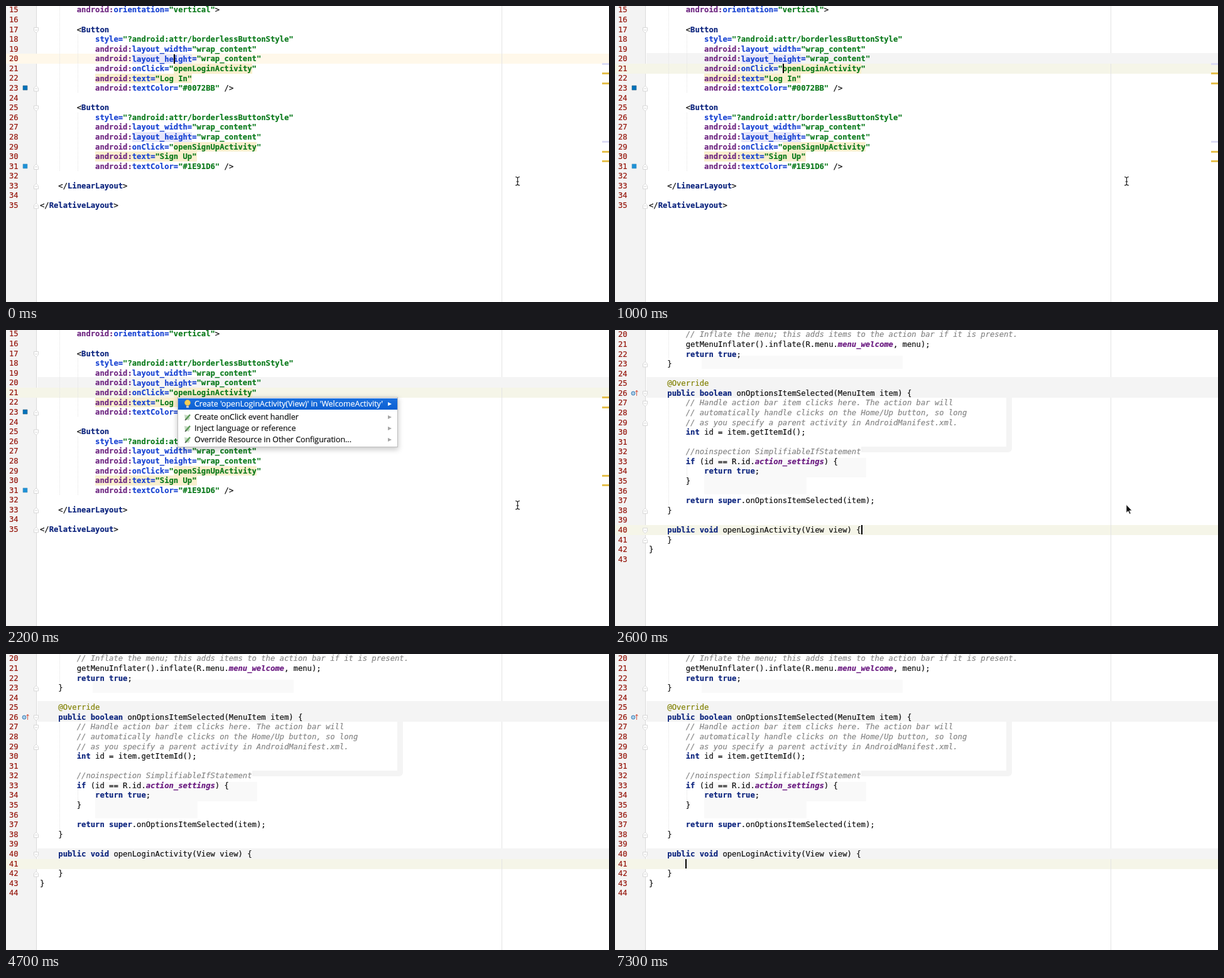
Write an HTML page that moves like this. It is 960 px wide and 472 px high and loops after 7.4 s.

```html
<!DOCTYPE html>
<html lang="en">
<head>
<meta charset="utf-8">
<title>Create an onClick handler</title>
<style>
  html, body { margin: 0; width: 100%; height: 100%; overflow: hidden; background: #fff; }
  #stage { position: absolute; left: 0; top: 0; width: 960px; height: 472px; overflow: hidden; }
  #stage svg, .view { position: absolute; left: 0; top: 0; width: 960px; height: 472px; }
  pre {
    position: absolute; left: 54px; margin: 0; color: #111;
    font: 12.2px/15.585px "DejaVu Sans Mono", monospace;
    -webkit-text-stroke: .2px;
  }
  pre.numbers { left: 5px; color: #96180e; }

  .tag, .key { color: #0b237d; font-weight: bold; }
  .ns { color: #6d2580; font-weight: bold; }
  .attr { color: #1742d2; font-weight: bold; }
  .str { color: #0b7a1c; font-weight: bold; }
  .note { color: #868686; font-style: italic; }
  .anno { color: #808000; }
  .field { color: #6a1a80; font-weight: bold; font-style: italic; }
  mark { color: inherit; padding: .7px 0; background: #f9efcd; }

  /* One shared clock: every change is a hard step */
  .timed, .usage, #row, #caret {
    animation-duration: 7.4s; animation-timing-function: step-end; animation-iteration-count: infinite;
  }
  #row { position: absolute; left: 0; top: 0; width: 960px; height: 16px; animation-name: row; }
  #caret { position: absolute; left: 0; top: 0; width: 2px; height: 15px; background: #000; animation-name: caret, blink; }
  .usage { animation-name: forget; }
  #layout { animation-name: untilOpen; }
  #moved { animation-name: afterMove; }
  #popup { animation-name: menu; }
  #activity { animation-name: fromOpen; }
  #before { animation-name: untilEnter; }
  #entered, #after { animation-name: fromEnter; }
  #braces { animation-name: braces; }

  @keyframes row {
    0% { transform: translateY(76px); background: #fff8ea; }
    12.16% { transform: translateY(92px); background: #f5f5e8; }
    33.78% { transform: translateY(311px); background: #f5f5e8; }
    54.05%, 100% { transform: translateY(327px); background: #f5f5e8; }
  }
  @keyframes caret {
    0% { transform: translate(267px, 77px); }
    12.16% { transform: translate(267px, 92px); }
    33.78% { transform: translate(392px, 311px); }
    54.05%, 100% { transform: translate(112px, 327px); }
  }
  @keyframes blink {
    0%, 12.16%, 33.78%, 47.29%, 54.05%, 67.56%, 81.08%, 94.59% { opacity: 1; }
    6.75%, 18.91%, 40.54%, 60.81%, 74.32%, 87.83% { opacity: 0; }
    100% { opacity: 1; }
  }
  @keyframes forget {
    0% { background: #e6e6fa; fill: #dcdcf5; }
    16.21%, 100% { background: transparent; fill: transparent; }
  }
  @keyframes untilOpen { 0% { opacity: 1; } 33.78%, 100% { opacity: 0; } }
  @keyframes afterMove { 0% { opacity: 0; } 12.16%, 100% { opacity: 1; } }
  @keyframes menu { 0% { opacity: 0; } 24.32%, 100% { opacity: 1; } }
  @keyframes fromOpen { 0% { opacity: 0; } 33.78%, 100% { opacity: 1; } }
  @keyframes untilEnter { 0% { opacity: 1; } 54.05%, 100% { opacity: 0; } }
  @keyframes fromEnter { 0% { opacity: 0; } 54.05%, 100% { opacity: 1; } }
  @keyframes braces { 0% { opacity: 0; } 36.48%, 100% { opacity: 1; } }

  #popup {
    position: absolute; left: 274px; top: 108px; width: 349px; height: 78px; background: #fff;
    box-shadow: 0 0 0 1px #bdbdbd, 0 3px 8px 2px rgba(0, 0, 0, .2);
    font: 12.4px/18px "Open Sans", "Noto Sans", sans-serif; color: #111;
    -webkit-text-stroke: .2px;
  }
  #popup div { position: absolute; left: 0; width: 323px; height: 18px; padding-left: 26px; white-space: pre; }
  #popup div:first-child { background: linear-gradient(#1b70de, #0b5fd2); color: #fff; }
  #popup div::after {
    content: ""; position: absolute; left: 334px; top: 6px;
    border: solid transparent; border-width: 3.5px 0 3.5px 6px; border-left-color: #a5a5a5;
  }
  #popup div:first-child::after { border-left-color: #fff; }
  #popup div svg { left: 7px; top: 1px; width: 16px; height: 16px; }
</style>
</head>
<body>
<div id="stage">
  <svg>
    <path d="M0 0H48V472H0Z" fill="#f3f3f3"/>
    <path d="M48.5 0V472" stroke="#dadada"/>
  </svg>
  <div id="row"></div>
  <svg><path d="M789.5 0V472" stroke="#e3e3e3"/></svg>

  <div id="layout" class="view timed">
    <svg>
      <path id="moved" class="timed" d="M50 75H960V92H50Z" fill="#f4f4f4"/>
      <path d="M85.5 0V263M114.5 45V139M114.5 170V263" stroke="#e2e2e2" stroke-dasharray="1 1"/>
      <path d="M27 127h7v7h-7z" fill="#0072bb" stroke="#3d6680" stroke-width=".6"/>
      <path d="M27 252h7v7h-7z" fill="#1e91d6" stroke="#5e9cc2" stroke-width=".6"/>
      <path class="usage" d="M949 91h11v3h-11zM949 215h11v3h-11z"/>
      <path d="M949 106h11v3h-11zM949 122h11v3h-11zM949 231h11v3h-11zM949 246h11v3h-11z" fill="#e5c04d"/>
      <g class="folds"></g>
      <path d="M811 272.5q3 0 3.5 2q.5-2 3.5-2M814.5 274v10M811 286q3 0 3.5-2q.5 2 3.5 2M812.5 280h4"
        fill="none" stroke="#222" stroke-width="1.2"/>
    </svg>
    <div id="popup" class="timed">
      <div style="top:1px">Create 'openLoginActivity(View)' in 'WelcomeActivity'</div>
      <div style="top:22px">Create onClick event handler</div>
      <div style="top:40px">Inject language or reference</div>
      <div style="top:58px">Override Resource in Other Configuration...</div>
    </div>
  </div>

  <div id="activity" class="view timed">
    <svg>
      <path d="M50 75H960V108H50ZM623 108h9v80q0 7-7 7H392v-9H623Z" fill="#f4f4f4"/>
      <path d="M138 41H458V62H138ZM142 204H400V235H142ZM142 235H305V262H142Z" fill="#f9f9f9"/>
      <path id="entered" class="timed" d="M50 310H960V327H50Z" fill="#f4f4f4"/>
      <path d="M85.5 0V46M85.5 108V279M114.5 217V233" stroke="#e2e2e2" stroke-dasharray="1 1"/>
      <circle cx="29" cy="101" r="3" fill="#a8cbe6" stroke="#3c7fb5"/>
      <path d="M34.5 105V97M32.5 99l2-3l2 3" fill="none" stroke="#d0604e"/>
      <g class="folds"></g>
    </svg>
    <div id="before" class="view timed">
      <svg>
        <g class="folds"></g>
        <path d="M814 278.5v13l3-2.8l2.2 4.8l2-1l-2.2-4.5h4z" fill="#111" stroke="#fff" stroke-width=".7"/>
      </svg>
    </div>
    <div id="after" class="view timed">
      <svg><g class="folds"></g></svg>
    </div>
  </div>
  <div id="caret"></div>
</div>

<script>
const LINE = 15.585;

// [ ] marks a warning, { } a usage of the name under the caret
const button = (handler, label, color) => `        <Button
            style="?android:attr/borderlessButtonStyle"
            android:layout_width="wrap_content"
            android:{layout_height}="wrap_content"
            android:onClick="[${handler}]"
            [android:text="${label}"]
            android:textColor="${color}" />
`;

const layoutCode = `        android:orientation="vertical">

${button('openLoginActivity', 'Log In', '#0072BB')}
${button('openSignUpActivity', 'Sign Up', '#1E91D6')}
    </LinearLayout>

</RelativeLayout>`;

const activityCode = `        // Inflate the menu; this adds items to the action bar if it is present.
        getMenuInflater().inflate(R.menu.menu_welcome, menu);
        return true;
    }

    @Override
    public boolean onOptionsItemSelected(MenuItem item) {
        // Handle action bar item clicks here. The action bar will
        // automatically handle clicks on the Home/Up button, so long
        // as you specify a parent activity in AndroidManifest.xml.
        int id = item.getItemId();

        //noinspection SimplifiableIfStatement
        if (id == R.id.action_settings) {
            return true;
        }

        return super.onOptionsItemSelected(item);
    }

    public void openLoginActivity(View view) {`;

const span = (name, text) => `<span class="${name}">${text}</span>`;

function paintXml(code) {
  return code.replace(/</g, '&lt;').replace(/>/g, '&gt;')
    .replace(/"[^"]*"|android:|\w+(?=}?=)|=|(?<=&lt;\/?)\w+/g, t => span(
      t[0] === '"' ? 'str' : t === 'android:' ? 'ns' : /^[A-Z]/.test(t) ? 'tag' : 'attr', t))
    .replace(/\[/g, '<mark>').replace(/{/g, '<mark class="usage">').replace(/[\]}]/g, '</mark>');
}

function paintJava(code) {
  const token = /\/\/.*|@\w+|\b(?:menu_welcome|action_settings)\b|\b(?:public|boolean|int|return|true|if|super|void)\b/g;
  return code.replace(token, t => span(
    t[0] === '/' ? 'note' : t[0] === '@' ? 'anno' : t.includes('_') ? 'field' : 'key', t));
}

// Adds numbered code above a view's shapes, and its fold handles
function addCode(id, top, first, code, paint, folds) {
  const view = document.getElementById(id);
  const numbers = code.split('\n').map((_, i) => first + i).join('\n');
  const style = `style="top:${top}px"`;
  view.querySelector('svg').insertAdjacentHTML('afterend',
    `<pre class="numbers" ${style}>${numbers}</pre><pre ${style}>\n${paint(code)}</pre>`);
  view.querySelector('.folds').innerHTML = folds.map(n => {
    const y = top + (Math.abs(n) - first + .5) * LINE;
    return `<path transform="translate(48 ${y}) scale(1 ${Math.sign(n)})"
      d="M-3.5-4h7v5l-3.5 3.5l-3.5-3.5zM-2 0h4" fill="#fff" stroke="#d6d6d6"/>`;
  }).join('');
}

// Negative rows close a fold
const layoutTop = -.6, activityTop = .4, tailTop = activityTop + 21 * LINE;
addCode('layout', layoutTop, 15, layoutCode, paintXml, [17, -23, 25, -31, -33, -35]);
addCode('activity', activityTop, 20, activityCode, paintJava, [-23, 26, 27, -29, -38, 40]);
addCode('before', tailTop, 41, '    }\n}\n', paintJava, [-41]);
addCode('after', tailTop, 41, '\n    }\n}\n', paintJava, [-42]);

// Matched braces lie beneath the code
document.querySelector('#activity > svg').insertAdjacentHTML('afterend', `
  <div class="view timed" style="animation-name:untilEnter"><svg><g id="braces" class="timed">
    <path d="M385 311h7v16h-7zM83 327h7v15h-7z" fill="#a6d6f7"/>
    <path d="M40.5 311V341" stroke="#b4bcc2"/>
  </g></svg></div>`);

const bulb = `<svg><circle cx="8" cy="6" r="4.5" fill="#f5cf58" stroke="#d9a93a" stroke-width=".7"/>
  <path d="M6 11h4v3h-4z" fill="#c9c9c9"/></svg>`;
const pencil = `<svg><path d="M3 4l5 1l4 4l-2 4l-6-2z" fill="#c5d9c3"/>
  <path d="M5 12l7-8" stroke="#5c9a58" stroke-width="2.5"/><path d="M4 13l2-2" stroke="#555" stroke-width="1.5"/></svg>`;
document.querySelectorAll('#popup div').forEach((item, i) =>
  item.insertAdjacentHTML('beforeend', i ? pencil : bulb));
</script>
</body>
</html>
```
